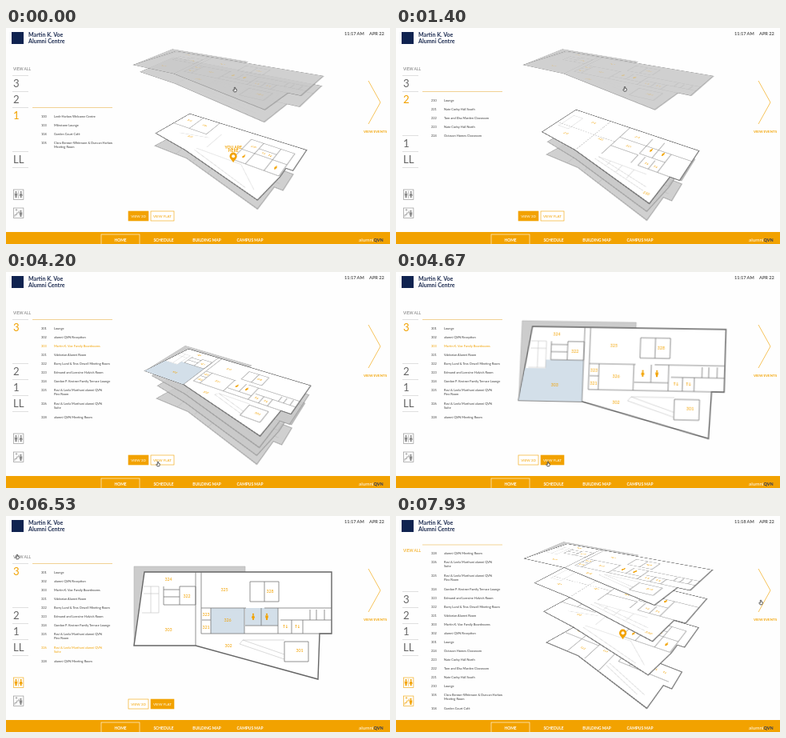
An HTML page that plays this animation: 480 px wide and 270 px high, repeating every 8000 ms.

```html
<!DOCTYPE html>
<html lang="en">
<head>
<meta charset="utf-8">
<title>Building directory</title>
<style>
  html, body { margin: 0; width: 100%; height: 100%; overflow: hidden; background: #fefefe; }
  #stage { position: absolute; left: 0; top: 0; width: 480px; height: 270px; overflow: hidden; }
  #stage > svg { position: absolute; left: 0; top: 0; overflow: visible; }
  .floor { transform-origin: 0 0; }
  text { font-family: Lato, "Open Sans", sans-serif; }
</style>
</head>
<body>
<div id="stage"></div>
<script>
const LOOP = 8000, ORANGE = '#f2a200', DARK = '#3c3c3c', GREY = '#777';
const stage = document.getElementById('stage');

function add(parent, tag, attrs = {}, content) {
  const node = document.createElementNS('http://www.w3.org/2000/svg', tag);
  for (const key in attrs) node.setAttribute(key, attrs[key]);
  if (content !== undefined) node.textContent = content;
  parent.appendChild(node);
  return node;
}
const layer = () => add(stage, 'svg', { width: 480, height: 270, viewBox: '0 0 480 270' });
const label = (parent, x, y, size, fill, content, more) =>
  add(parent, 'text', { x, y, 'font-size': size, fill, ...more }, content);
const line = (parent, d, stroke, width = 0.6, more) =>
  add(parent, 'path', { d, stroke, 'stroke-width': width, fill: 'none', ...more });
const box = (parent, x, y, width, height, fill, stroke = 'none', more) =>
  add(parent, 'rect', { x, y, width, height, fill, stroke, 'stroke-width': 0.6, ...more });

function person(parent, x, y, skirt) {
  const g = add(parent, 'g', { transform: `translate(${x} ${y})` });
  add(g, 'circle', { cy: -3.2, r: 1.1 });
  add(g, 'path', { d: skirt ? 'M-1-1.8H1L2.2 1.6H.9V4H-.9V1.6H-2.2z' : 'M-1.7-1.8H1.7V1.4H1V4H-1V1.4H-1.7z' });
}

const mix = (a, b, p) => a + (b - a) * p;
const clamp = v => Math.max(0, Math.min(1, v));
const easeOut = u => 1 - (1 - u) ** 3;
const smooth = u => u * u * (3 - 2 * u);

// ---- static interface ----
const ui = layer();
const BOLD = { 'font-weight': 700 }, MID = { 'text-anchor': 'middle', 'font-weight': 700 };
box(ui, 7, 5, 15, 15, '#0f2350');
label(ui, 28, 10.7, 7.1, '#1c2b50', 'Martin K. Voe', BOLD);
label(ui, 28, 18.9, 7.1, '#1c2b50', 'Alumni Centre', BOLD);
const clock = label(ui, 423, 9.2, 5.6, '#555', '', BOLD);
label(ui, 454, 9.2, 5.6, '#555', 'APR 22', BOLD);
line(ui, 'M453 66L468 93L453 120', '#f5bd4a', 0.9);
label(ui, 447, 130.8, 4.4, ORANGE, 'VIEW EVENTS', BOLD);

box(ui, 0, 255, 480, 15, ORANGE);
box(ui, 119, 258, 48, 14, 'none', '#fff');
[['HOME', 143], ['SCHEDULE', 197], ['BUILDING MAP', 251], ['CAMPUS MAP', 305]]
  .forEach(([name, x]) => label(ui, x, 266.6, 4.9, '#fff', name, MID));
const brand = label(ui, 441, 267, 6.4, '#fff', 'alumni');
add(brand, 'tspan', { fill: '#26345c', 'font-weight': 700, 'font-size': 5.4 }, 'QVN');

const buttons = [['VIEW 3D', 153, 25], ['VIEW FLAT', 181, 29]].map(([name, x, w]) => ({
  rect: box(ui, x, 229, w, 12, '#fff', ORANGE),
  text: label(ui, x + w / 2, 236.8, 4.5, ORANGE, name, { 'text-anchor': 'middle' })
}));

const washIcon = add(ui, 'g');
box(washIcon, 9.3, 202, 12.6, 12.6, 'none', 'currentColor');
line(washIcon, 'M15.6 203.5V213', 'currentColor', 0.5);
person(washIcon, 12.5, 208.2, false);
person(washIcon, 18.7, 208.2, true);
const liftIcon = add(ui, 'g');
box(liftIcon, 9.3, 225, 12.6, 12.6, 'none', 'currentColor');
line(liftIcon, 'M11 236V233.5H13.5V231H16V228.5M13 229V226.5L12 227.7M13 226.5L14 227.7', 'currentColor', 0.7);
person(liftIcon, 18.5, 232, false);

// ---- floor menu and room lists ----
const viewAll = label(ui, 9, 0, 4.9, GREY, 'VIEW ALL');
const menu = ['3', '2', '1', 'LL'].map(name => ({
  text: label(ui, 9, 0, 13.2, '#666', name),
  rule: line(ui, 'M8 0H28', '#ccc', 0.6)
}));
line(ui, 'M8 174.5H28', '#ccc');

const rooms3 = ['301|Lounge', '302|alumni QVN Reception', '303|Martin K. Voe Family Boardrooms',
  '321|Valdorian Alumni Room', '322|Barry Lund & Tess Orwell Meeting Room',
  '323|Edmund and Lorraine Halvick Room', '324|Gordon P. Kestner Family Terrace Lounge',
  '325|Ravi & Leela Marthani alumni QVN|Flex Room', '326|Ravi & Leela Marthani alumni QVN|Suite',
  '328|alumni QVN Meeting Room'];
const rooms2 = ['210|Lounge', '221|Nate Corby Hall South', '222|Tom and Elsa Marden Classroom',
  '223|Nate Corby Hall North', '224|Octavon Homes Classroom'];
const rooms1 = ['100|Lenk-Harlow Welcome Centre', '103|Milestone Lounge', '104|Garden Court Café',
  '105|Clara Benton-Whitmore & Duncan Harlow|Meeting Room'];

function makeList(rooms, top) {
  const g = add(ui, 'g'), rows = {};
  line(g, `M33 ${top - 10.5}H133`, '#e9b650', 0.6);
  let y = top;
  for (const room of rooms) {
    const [number, ...names] = room.split('|');
    const row = rows[number] = add(g, 'g', { fill: DARK });
    label(row, 44, y + 1.5, 3.9, 'inherit', number);
    names.forEach((name, i) => label(row, 60, y + 1.5 + i * 5.4, 3.95, 'inherit', name));
    row.querySelectorAll('text').forEach(t => t.removeAttribute('fill'));
    y += names.length > 1 ? 17 : 11;
  }
  return { g, rows };
}
const lists = {
  0: makeList(rooms3, 70),
  1: makeList(rooms2, 90),
  2: makeList(rooms1, 110),
  '-1': makeList([...rooms1.slice(2), ...rooms2, ...rooms3].reverse(), 46.5)
};

// ---- floor plans, in the coordinates of the flat view ----
const plans = [
  { // level 3
    outline: '173,70 407,70 407,147 392,147 390,204 237,162 160,162',
    roof: '160,63 299,63 299,75 178,75 172,110 160,162',
    walls: 'M237 70V162M244 70V147H407M197 88V111M197 92H217M197 101H217M217 88H237V111H197M217 88V111' +
      'M244 115H300M323 115H407M245 130H256M256 115V147M298 115V147M319 115V137M340 115V147M299 137H340' +
      'M305 82V107H341V82H305M323 82V107M343 130H407M357 130V147M371 130V147M380 117V130M388 117V130M398 117V130' +
      'M348 157H378V182H348Z',
    faint: 'M172 88H191V121H170M172 97H191M181 88V121M296 155L348 173M292 160L348 179M296 155H348M292 160L296 155',
    labels: [[324, 203, 79], [325, 273, 92], [328, 330, 94], [322, 226, 100], [323, 250, 123],
      [321, 250, 139], [326, 277, 130], [303, 203, 142], [302, 278, 162], [301, 367, 168]],
    wash: [309, 326, 126], lifts: [349, 364, 138]
  },
  { // level 2
    outline: '160,66 407,70 407,147 392,147 390,204 237,162 160,150',
    walls: 'M278 69V150M278 100H407M328 78V122M350 78V122M328 122H372M278 126H328V147M340 125V147H392M357 125V147M372 100V147',
    faint: 'M170 84H190V122H168M170 84V122M278 158L372 180M276 164L372 188M278 158H360M300 158V168M320 158V174M340 158V178',
    dash: 'M238 70V160M165 115H278',
    labels: [[221, 215, 86], [223, 196, 134], [222, 255, 120], [224, 303, 86], [225, 304, 114], [210, 378, 190]],
    wash: [340, 361, 106], lifts: [349, 364, 137]
  },
  { // level 1
    outline: '175,74 403,70 403,126 392,126 392,147 385,200 237,162 168,150',
    walls: 'M205 74V112M170 112H240M240 74V112M312 88H390V146H312ZM312 118H390M335 88V146M366 88V146M335 104H366',
    faint: 'M250 150L330 150L372 186M250 155L360 188M262 100V140M200 130L250 118',
    labels: [[105, 190, 92], [104, 222, 92], [103, 222, 130], [100, 325, 104]],
    wash: [324, 378, 132], lifts: [347, 358, 111]
  },
  { // lower level
    outline: '185,88 300,88 300,112 400,112 400,150 386,150 384,196 237,160 172,160',
    walls: 'M215 88V160M250 88V160M180 125H250M285 112V170M300 112V140H390M320 112V140M350 112V140',
    faint: 'M290 150L370 178M288 156L360 182',
    labels: [['LL1', 198, 110], ['LL2', 232, 108], ['LL3', 232, 142], ['LL4', 268, 130], ['LL5', 310, 126]],
    wash: [330, 342, 126], lifts: [360, 376, 126]
  }
];

const ROOM_303 = '166,122 191,122 191,111 237,111 237,162 160,162';
const ROOM_326 = '256,115 298,115 298,147 256,147';
const WASHROOMS = '299,115 340,115 340,137 299,137';

function makeFloor(plan) {
  const svg = add(stage, 'svg', { class: 'floor', width: 247, height: 134, viewBox: '160 70 247 134' });
  if (plan.roof) add(svg, 'polygon', { points: plan.roof, fill: '#ccc', stroke: '#aaa', 'stroke-width': 0.5 });
  const base = add(svg, 'polygon', { points: plan.outline, stroke: '#666', 'stroke-width': 1.4 });
  const marks = plan.roof ? [ROOM_303, ROOM_326, WASHROOMS]
    .map(points => add(svg, 'polygon', { points, fill: '#d3dfe9' })) : [];
  const detail = add(svg, 'g');
  line(detail, plan.faint, '#c2c2c2', 0.6);
  line(detail, plan.walls, '#777', 0.8);
  if (plan.dash) line(detail, plan.dash, '#999', 0.8, { 'stroke-dasharray': '3 2' });
  const signs = add(svg, 'g', { fill: ORANGE });
  plan.labels.forEach(([name, x, y]) => label(signs, x, y + 1.9, 5.3, ORANGE, name, { 'text-anchor': 'middle' }));
  const [w1, w2, wy] = plan.wash, [l1, l2, ly] = plan.lifts;
  person(signs, w1, wy, true);
  person(signs, w2, wy, false);
  for (const x of [l1, l2])
    line(signs, `M${x - 1.5} ${ly + 2}v-4l-1 1.2m1-1.2l1 1.2M${x + 1.8} ${ly - 2}v4l-1-1.2m1 1.2l1-1.2`, ORANGE, 0.6);
  return { svg, base, detail, signs, marks };
}
const floors = [];
for (let i = 3; i >= 0; i--) floors[i] = makeFloor(plans[i]);

const overlay = layer();
const pin = add(overlay, 'g');
add(pin, 'path', { d: 'M0 0C-1-3-4.6-4.6-4.6-8A4.6 4.6 0 0 1 4.6-8C4.6-4.6 1-3 0 0z', fill: ORANGE });
add(pin, 'circle', { cy: -8, r: 2, fill: '#fff' });
const here = add(pin, 'g');
label(here, 0, -17.5, 5, ORANGE, 'YOU ARE', MID);
label(here, 0, -12.9, 5, ORANGE, 'HERE', MID);
const cursor = add(overlay, 'path', {
  d: 'M-.7-2.6Q0-3.2.7-2.6V-.8L2.2-.4V1.4L1.5 2.8H-1L-2.3.8L-1.7.2L-.7.9z',
  fill: '#fff', stroke: '#222', 'stroke-width': 0.7
});

// ---- projection: rectangle corners clockwise from top left ----
const REST = [[221, 94], [381, 142], [333, 211], [147, 140]];
const LIFTED = [[205, 27.5], [397, 60], [343, 107], [134, 56]];
const FLAT = [[160, 70], [407, 70], [407, 204], [160, 204]];

function corners(drop, flat) {
  const swell = 1 + 0.24 * flat * Math.sqrt(1 - flat);
  return REST.map((p, i) => [283.5, 137].map((mid, a) => {
    const tilted = p[a] + (p[a] - LIFTED[i][a]) * drop;
    return mid + (mix(tilted, FLAT[i][a], flat) - mid) * swell;
  }));
}

function homography([[x0, y0], [x1, y1], [x2, y2], [x3, y3]]) {
  const ax = x1 - x2, ay = y1 - y2, bx = x3 - x2, by = y3 - y2;
  const sx = x0 - x1 + x2 - x3, sy = y0 - y1 + y2 - y3, den = ax * by - bx * ay;
  const g = (sx * by - bx * sy) / den, h = (ax * sy - sx * ay) / den;
  return {
    col: [x1 - x0 + g * x1, y1 - y0 + g * y1, g].map(v => v / 247),
    row: [x3 - x0 + h * x3, y3 - y0 + h * y3, h].map(v => v / 134),
    org: [x0, y0]
  };
}
const cssMatrix = ({ col: [a, d, g], row: [b, e, h], org: [c, f] }) =>
  `matrix3d(${[a, d, 0, g, b, e, 0, h, 0, 0, 1, 0, c, f, 0, 1].map(v => v.toFixed(9)).join()})`;
function project({ col, row, org }, x, y) {
  const u = x - 160, v = y - 70, w = col[2] * u + row[2] * v + 1;
  return [0, 1].map(i => (col[i] * u + row[i] * v + org[i]) / w);
}

// ---- timeline ----
const STACK = [0, 0.14, 0.28, 0.42];
const views = [
  { at: -1000, sel: 2, flat: 0, drop: [-1, -0.85, 0.14, 0.28] },
  { at: 600, sel: 1, flat: 0, drop: [-1, 0.14, 0.28, 0.42] },
  { at: 2130, sel: 0, flat: 0, drop: STACK },
  { at: 4270, sel: 0, flat: 1, drop: STACK },
  { at: 6700, sel: -1, flat: 0, drop: [-0.91, -0.47, -0.02, 0.42] }
];
const pointer = [[0, 286, 77], [2100, 286, 76], [2470, 284, 110], [3150, 207, 131], [3350, 207, 131],
  [4100, 190, 240], [4750, 190, 240], [5300, 277, 135], [5450, 277, 135], [5950, 15, 209],
  [6100, 15, 209], [6450, 14, 51], [6800, 14, 51], [7700, 456, 108], [8000, 456, 108]];

const menuY = (sel, i) => 69 + 20 * i + (i > sel ? 35 : 0);
const isActive = (view, i) => +(view.sel === i || view.sel === -1);

function draw(t) {
  const n = views.findLastIndex(v => t >= v.at);
  const now = views[n], was = views[Math.max(0, n - 1)];
  const p = easeOut(clamp((t - now.at) / 700));
  const flat = mix(was.flat, now.flat, p);
  const all = now.sel === -1;
  const picked303 = t >= 3200 && t < 5250, picked326 = t >= 5250 && !all, washOn = t >= 5950;

  clock.textContent = t < 6950 ? '11:17 AM' : '11:18 AM';

  floors.forEach((floor, i) => {
    const h = homography(corners(mix(was.drop[i], now.drop[i], p), flat));
    const active = mix(isActive(was, i), isActive(now, i), p);
    const tone = Math.round(mix(202, 255, active));
    floor.svg.style.transform = cssMatrix(h);
    floor.svg.style.opacity = i ? clamp(1 - flat * 1.5) : 1;
    floor.base.setAttribute('fill', `rgb(${tone},${tone},${tone})`);
    floor.base.setAttribute('fill-opacity', mix(0.87, 1, active));
    floor.base.setAttribute('stroke-opacity', mix(0.45, 1, active));
    floor.detail.setAttribute('opacity', mix(0.25, 1, active));
    floor.signs.setAttribute('opacity', mix(i === 0 ? 0.3 : 0, 1, active));
    if (i === 2) {
      const [x, y] = project(h, 318, 152);
      pin.setAttribute('transform', `translate(${x} ${y})`);
      pin.setAttribute('opacity', active * clamp(1 - flat * 1.5));
      here.setAttribute('opacity', now.sel === 2 ? 1 : 0);
    }
  });
  [picked303, picked326, washOn && !all].forEach((on, i) =>
    floors[0].marks[i].setAttribute('opacity', +on));

  viewAll.setAttribute('y', mix(was.sel < 0 ? 45 : 53.4, all ? 45 : 53.4, p));
  viewAll.setAttribute('fill', all ? ORANGE : GREY);
  menu.forEach(({ text, rule }, i) => {
    const y = mix(menuY(was.sel, i), menuY(now.sel, i), p);
    text.setAttribute('y', y + 4.7);
    text.setAttribute('fill', now.sel === i ? ORANGE : '#666');
    rule.setAttribute('transform', `translate(0 ${y - 9.5})`);
  });
  for (const key in lists) {
    const shown = +key === now.sel;
    const fresh = was.sel !== now.sel;
    lists[key].g.setAttribute('opacity', shown ? (fresh ? clamp((t - now.at) / 300) : 1) : 0);
  }
  lists[0].rows[303].setAttribute('fill', picked303 ? ORANGE : DARK);
  lists[0].rows[326].setAttribute('fill', picked326 ? ORANGE : DARK);

  buttons.forEach(({ rect, text }, i) => {
    const on = now.flat === i;
    rect.setAttribute('fill', on ? ORANGE : '#fff');
    text.setAttribute('fill', on ? '#fff' : ORANGE);
    rect.style.opacity = text.style.opacity = all ? 0 : 1;
  });
  [[washIcon, washOn], [liftIcon, all]].forEach(([icon, on]) => {
    icon.style.color = icon.style.fill = on ? ORANGE : '#888';
  });

  const m = Math.max(1, pointer.findIndex(k => k[0] > t));
  const [t0, x0, y0] = pointer[m - 1], [t1, x1, y1] = pointer[m];
  const q = smooth((t - t0) / (t1 - t0));
  cursor.setAttribute('transform', `translate(${mix(x0, x1, q)} ${mix(y0, y1, q)})`);
}

const start = performance.now();
function tick() {
  draw((performance.now() - start) % LOOP);
  requestAnimationFrame(tick);
}
tick();
</script>
</body>
</html>
```
